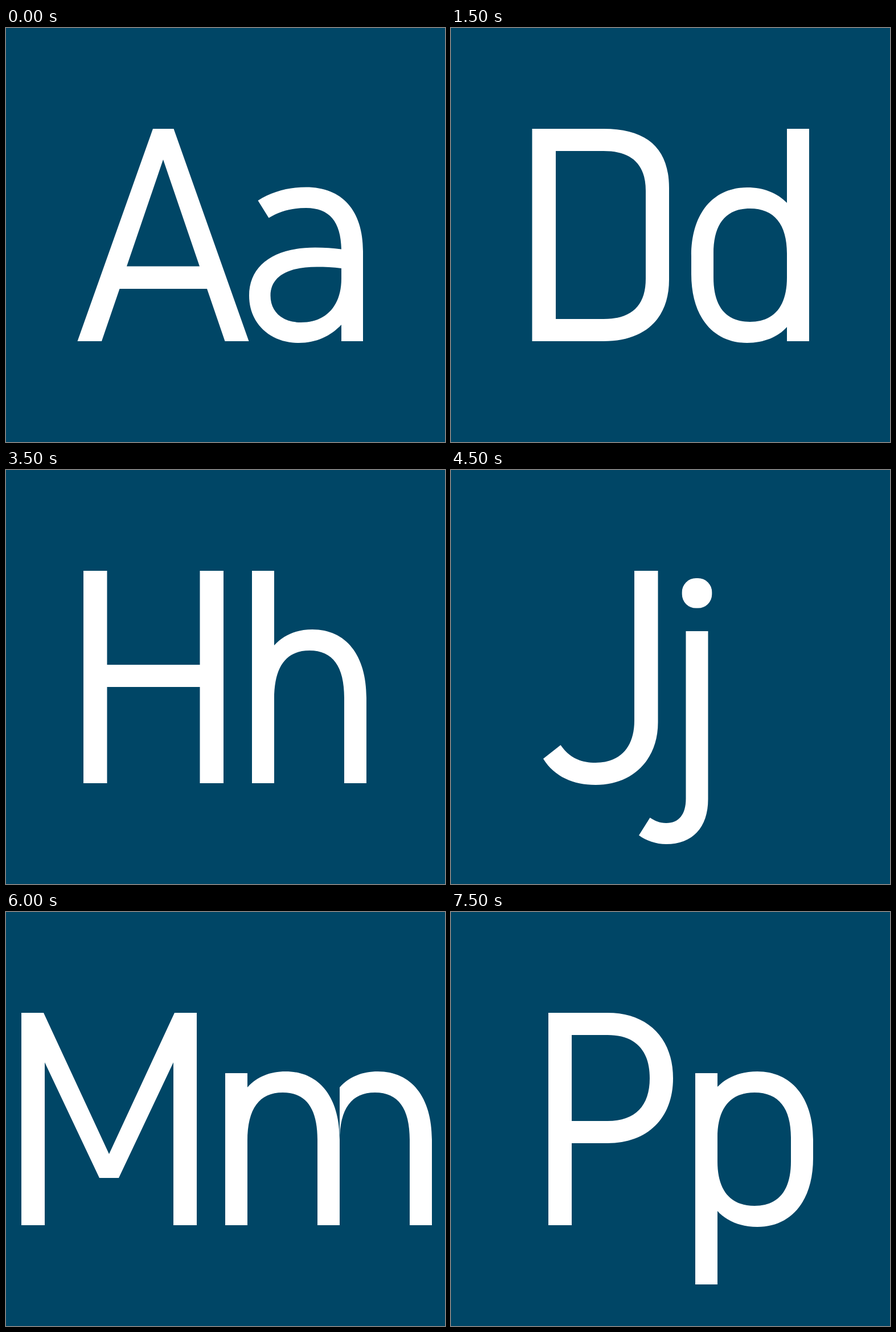
These frames come from a looping animation (771 px wide and 727 px high, 8000 ms). An HTML page:

```html
<!DOCTYPE html>
<html lang="en">
<head>
<meta charset="utf-8">
<title>Alphabet</title>
<style>
html, body { margin: 0; height: 100%; overflow: hidden; background: #004666; }
svg { display: block; width: 100%; height: 100%; }
</style>
</head>
<body>
<svg id="stage" viewBox="0 0 771 727" role="img" fill="#fff" fill-rule="evenodd" stroke-miterlimit="8"></svg>
<script>
const STEP = 500;
const CAP = 177, XLINE = 283, BASE = 550, DESC = 654;

const shape = (d, move = '') => `<path d="${d}" transform="${move}"/>`;
const line = (d, width) => `<path d="${d}" fill="none" stroke="#fff" stroke-width="${width}"/>`;
const box = (x, y, right, bottom) => shape(`M${x} ${y}H${right}V${bottom}H${x}Z`);
const capStem = x => box(x, CAP, x + 41.5, BASE);
const stem = (x, top = XLINE, bottom = BASE) => box(x, top, x + 39, bottom);
const dot = x => `<rect x="${x - 26.3}" y="190" width="52.6" height="52.6" rx="24.5"/>`;

// Round part of b, d, g and p, open towards its stem
const BOWL = 'M590 307C573 290 550 280 520 280C461 280 422 325 422 400V432C422 508 461 553 520 553' +
  'C550 553 575 542 590 525ZM525 317C482 317 461 345 461 396V438C461 488 482 516 525 516' +
  'C568 516 590 488 590 438V396C590 345 568 317 525 317Z';
const bowlLeft = dx => shape(BOWL, `translate(${dx})`);
const bowlRight = dx => shape(BOWL, `translate(${dx}) scale(-1 1)`);

// Shoulder of h, m and n; x is the right edge of the stem it grows from
const arch = x => shape('M0 308C17 289 40 280 67 280C126 280 162 325 162 400V550H123V400' +
  'C123 345 103 317 62 317C21 317 0 345 0 402Z', `translate(${x})`);

const pairs = [
  ['Aa',
    shape('M125.5 550L258 177H294.5L426.5 550H384.5L353 458H199.5L168 550ZM212 418.5H340L276 231Z'),
    shape('M442.5 303C466 288 495 279.5 527 279.5C590 279.5 627 320 627 392V550H589V521' +
      'C570 541 545 553 514 553C464 553 427 519 427 470C427 417 470 385.5 543 385.5' +
      'C559 385.5 575 386.5 589 388.5C588 340 568 316 527 316C501 316 480 322 461.5 333.5Z' +
      'M589 422C575 420 560 419.5 546 419.5C494 419.5 464.5 437 464.5 470' +
      'C464.5 498 485 517 518 517C562 517 589 488 589 440Z')],
  ['Bb',
    shape('M142 177H258C321 177 358 213 358 274C358 314 342 341 314 356C350 370 370 402 370 444' +
      'C370 512 328 550 264 550H142ZM183.5 216V339H256C295 339 317 315 317 277C317 239 295 216 256 216Z' +
      'M183.5 378V511H264C306 511 329 486 329 445C329 403 306 378 264 378Z'),
    stem(411, CAP), bowlRight(1040)],
  ['Cc',
    line('M369 247C352 212 318 193.5 277 193.5C208 193.5 172.5 229 172.5 297V430' +
      'C172.5 498 208 533.5 277 533.5C318 533.5 352 515 369 480', 40),
    line('M601 333C585 309 562 298.5 530 298.5C475 298.5 444 333 444 398V434' +
      'C444 500 475 534.5 530 534.5C562 534.5 585 523 601 499', 38)],
  ['Dd',
    shape('M142.5 177H268C345 177 383 212 383 281V442C383 509 342 550 268 550H142.5Z' +
      'M184 216V511H268C316 511 342 489 342 440V286C342 238 316 216 268 216Z'),
    stem(590, CAP), bowlLeft(0)],
  ['Ee',
    capStem(181), box(200, CAP, 393, 216), box(200, 341, 374, 380), box(200, 511, 393, BASE),
    line('M446.5 418H614.5V398C614.5 333 585 298.5 531 298.5C476 298.5 446.5 333 446.5 398V434' +
      'C446.5 500 478 534.5 538 534.5C567 534.5 592 525 613 504', 38)],
  ['Ff',
    capStem(181), box(200, CAP, 382, 216), box(200, 338.5, 354, 378),
    shape('M440.5 550V317.5H396V283H440.5V262C440.5 207 474 174 524 174C538 174 550 176 560.5 180' +
      'L552 214.5C543 211 534 210 525 210C496 210 479.5 229 479.5 264V283H541V317.5H479.5V550Z')],
  ['Gg',
    line('M359 247C343 212 309 193.5 261 193.5C191 193.5 154.5 229 154.5 297V430' +
      'C154.5 498 191 533.5 261 533.5C325 533.5 359.5 500 359.5 435V375H262', 40),
    bowlLeft(3),
    line('M612.5 283V575C612.5 617 581 638.5 530 638.5C497 638.5 472 630 450 610', 39)],
  ['Hh',
    capStem(136), capStem(340.5), box(160, 342, 360, 381),
    stem(432, CAP), arch(471)],
  ['Ii', capStem(320), stem(411.5), dot(431)],
  ['Jj',
    shape('M322 177H363.5V443C363.5 510 318 553 254 553C214 553 181 538 162 507L192.5 483' +
      'C207 504 226 514 254 514C297 514 322 487 322 440Z'),
    dot(432),
    shape('M412.5 283H451.5V578C451.5 628 424 657 378 657C360 657 343 651 330 641.5L349.5 610.5' +
      'C358 616 366 620 378 620C400 620 412.5 605 412.5 577Z')],
  ['Kk',
    capStem(150), shape('M191.5 428V364L340 177H390L274 323L402 550H355L246 359Z'),
    stem(439, CAP), shape('M478 441V388L574 283H622L548 364L634 550H589L521 394Z')],
  ['Ll', capStem(240.5), box(260, 511, 453, BASE), stem(492, CAP)],
  ['Mm',
    shape('M27 550V177H66L181 425L296 177H335V550H294V264L198 467H164L68 264V550Z'),
    stem(385), arch(424), arch(586)],
  ['Nn',
    shape('M138.5 550V177H175L343 468V177H384.5V550H348L180 259.5V550Z'),
    stem(435), arch(474)],
  ['Oo',
    line('M257 193.5C186 193.5 149.5 229 149.5 297V430C149.5 498 186 533.5 257 533.5' +
      'C328 533.5 364.5 498 364.5 430V297C364.5 229 328 193.5 257 193.5Z', 40.5),
    line('M534 298.5C476 298.5 444 333 444 398V435C444 500 476 534.5 534 534.5' +
      'C592 534.5 624 500 624 435V398C624 333 592 298.5 534 298.5Z', 38)],
  ['Pp',
    shape('M171 177H275C345 177 390 221 390 292C390 362 345 406 275 406H212V550H171Z' +
      'M212 216V367H275C324 367 349 340 349 292C349 243 324 216 275 216Z'),
    stem(429, XLINE, DESC), bowlRight(1058)],
];

const stage = document.getElementById('stage');
let shown = -1;

function draw() {
  const index = Math.floor(performance.now() / STEP) % pairs.length;
  if (index !== shown) {
    const [name, ...parts] = pairs[shown = index];
    stage.setAttribute('aria-label', name);
    stage.innerHTML = parts.join('');
  }
  requestAnimationFrame(draw);
}
draw();
</script>
</body>
</html>
```
